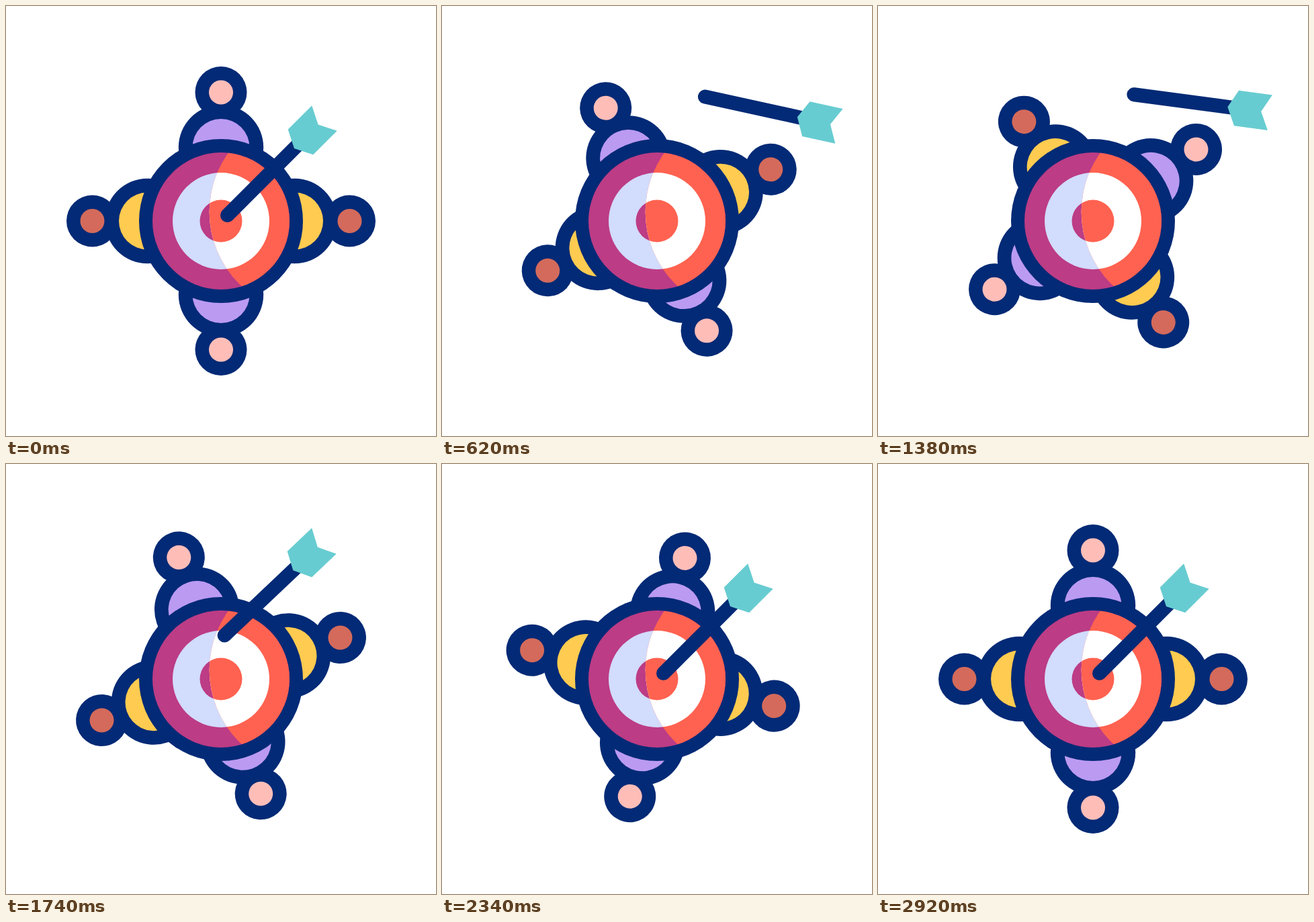
Write an HTML page that moves like this. It is 640 by 640 pixels and loops after 3.6 s.

```html
<!DOCTYPE html>
<html lang="en">
<head>
<meta charset="utf-8">
<title>Team target</title>
<style>
  html, body { margin: 0; width: 100%; height: 100%; overflow: hidden; background: #fff; }
  svg { display: block; width: 100%; height: 100%; }
</style>
</head>
<body>
<svg viewBox="0 0 640 640">
  <defs>
    <clipPath id="lit"><circle cx="454.5" cy="306.5" r="151.8"/></clipPath>
  </defs>
  <g id="team"></g>
  <circle cx="320" cy="320" r="122" fill="#032a76"/>
  <g id="shade"></g>
  <g id="light" clip-path="url(#lit)"></g>
  <g id="arrow">
    <path d="M-96 0H60" stroke="#032a76" stroke-width="21" stroke-linecap="round"/>
    <path d="M58 -26.5H108.3L95 0L108.3 26.5H58L44.7 0Z" fill="#67ccd1"/>
  </g>
</svg>
<script>
const LOOP = 3600, STEP = 20;
const BEAT = 800, BEATS = 3, STAGGER = 140, DEPTH = 13.5;
const NAVY = '#032a76';

// Moments in ms: fully wound up, arrow hits, spin overshoots, all at rest.
const WOUND = 1000, HIT = 1840, OVER = 2260, REST = 2920;
const WIND_ANGLE = -28.4, OVER_ANGLE = 193.7;

const STUCK = { x: 397.4, y: 243.6, angle: -45 };
const AWAY = { x: 499, y: 159.5, angle: 17.3 };
const OUT_BEND = { x: 408, y: 129 };
const BACK_BEND = { x: 377.4, y: 71.2 };

const soft = ease(.33, .32);
const whirl = ease(.36, .25);
const fling = ease(.33, .08);
const dive = ease(.98, .78);
const turn = ease(.87, .5);

// Equals cubic-bezier(x1, 0, x2, 1).
function ease(x1, x2) {
  return x => {
    let lo = 0, hi = 1, s;
    for (let i = 0; i < 24; i++) {
      s = (lo + hi) / 2;
      const at = 3 * x1 * s * (1 - s) ** 2 + 3 * x2 * s * s * (1 - s) + s ** 3;
      if (at < x) lo = s; else hi = s;
    }
    return s * s * (3 - 2 * s);
  };
}

const el = id => document.getElementById(id);
const clamp = (v, max) => Math.min(Math.max(v, 0), max);
const part = (t, from, to) => clamp((t - from) / (to - from), 1);
const mix = (a, b, p) => a + (b - a) * p;
const bend = (a, c, b, p) => mix(mix(a, c, p), mix(c, b, p), p);

function svg(parent, tag, attrs = {}) {
  const node = document.createElementNS('http://www.w3.org/2000/svg', tag);
  Object.entries(attrs).forEach(([k, v]) => node.setAttribute(k, v));
  parent.append(node);
  return node;
}

const circle = (parent, cx, cy, r, fill) => svg(parent, 'circle', { cx, cy, r, fill });

function rings(parent, outer, middle) {
  circle(parent, 320, 320, 102, outer);
  circle(parent, 320, 320, 72, middle);
  circle(parent, 320, 320, 31.5, outer);
}

function addPerson(i) {
  const g = svg(el('team'), 'g');
  const [body, head] = i % 2 ? ['#ffcb50', '#d46a5b'] : ['#bb9af2', '#ffbdb8'];
  circle(g, 0, -109.5, 63.2, NAVY);
  circle(g, 0, -191.5, 38.5, NAVY);
  circle(g, 0, -109.5, 42.5, body);
  circle(g, 0, -191.5, 18, head);
  return g;
}

function spinAt(t) {
  if (t < WOUND) return mix(0, WIND_ANGLE, soft(part(t, 0, WOUND)));
  if (t < OVER) return mix(WIND_ANGLE, OVER_ANGLE, whirl(part(t, WOUND, OVER)));
  return mix(OVER_ANGLE, 180, soft(part(t, OVER, REST)));
}

function dipAt(t) {
  return DEPTH * (1 - Math.cos(2 * Math.PI * clamp(t, BEAT * BEATS) / BEAT)) / 2;
}

function arrowAt(t) {
  const out = t < WOUND;
  const [from, to, via] = out ? [STUCK, AWAY, OUT_BEND] : [AWAY, STUCK, BACK_BEND];
  const u = out ? part(t, 0, WOUND) : part(t, WOUND, HIT);
  const p = (out ? fling : dive)(u);
  return {
    x: bend(from.x, via.x, to.x, p),
    y: bend(from.y, via.y, to.y, p),
    angle: mix(from.angle, to.angle, (out ? fling : turn)(u))
  };
}

rings(el('shade'), '#bc3c85', '#d2dcfd');
rings(el('light'), '#ff6250', '#ffffff');
const people = [0, 1, 2, 3].map(addPerson);

function draw(t) {
  const spin = spinAt(t);
  people.forEach((g, i) => {
    const dip = dipAt(t - STAGGER * ((i + 3) % 4));
    g.setAttribute('transform',
      `translate(320 320) rotate(${spin + 90 * i}) translate(0 ${dip})`);
  });
  const { x, y, angle } = arrowAt(t);
  el('arrow').setAttribute('transform', `translate(${x} ${y}) rotate(${angle})`);
}

const start = performance.now();
function tick() {
  const t = (performance.now() - start) % LOOP;
  draw(Math.floor(t / STEP) * STEP);
  requestAnimationFrame(tick);
}
tick();
</script>
</body>
</html>
```
